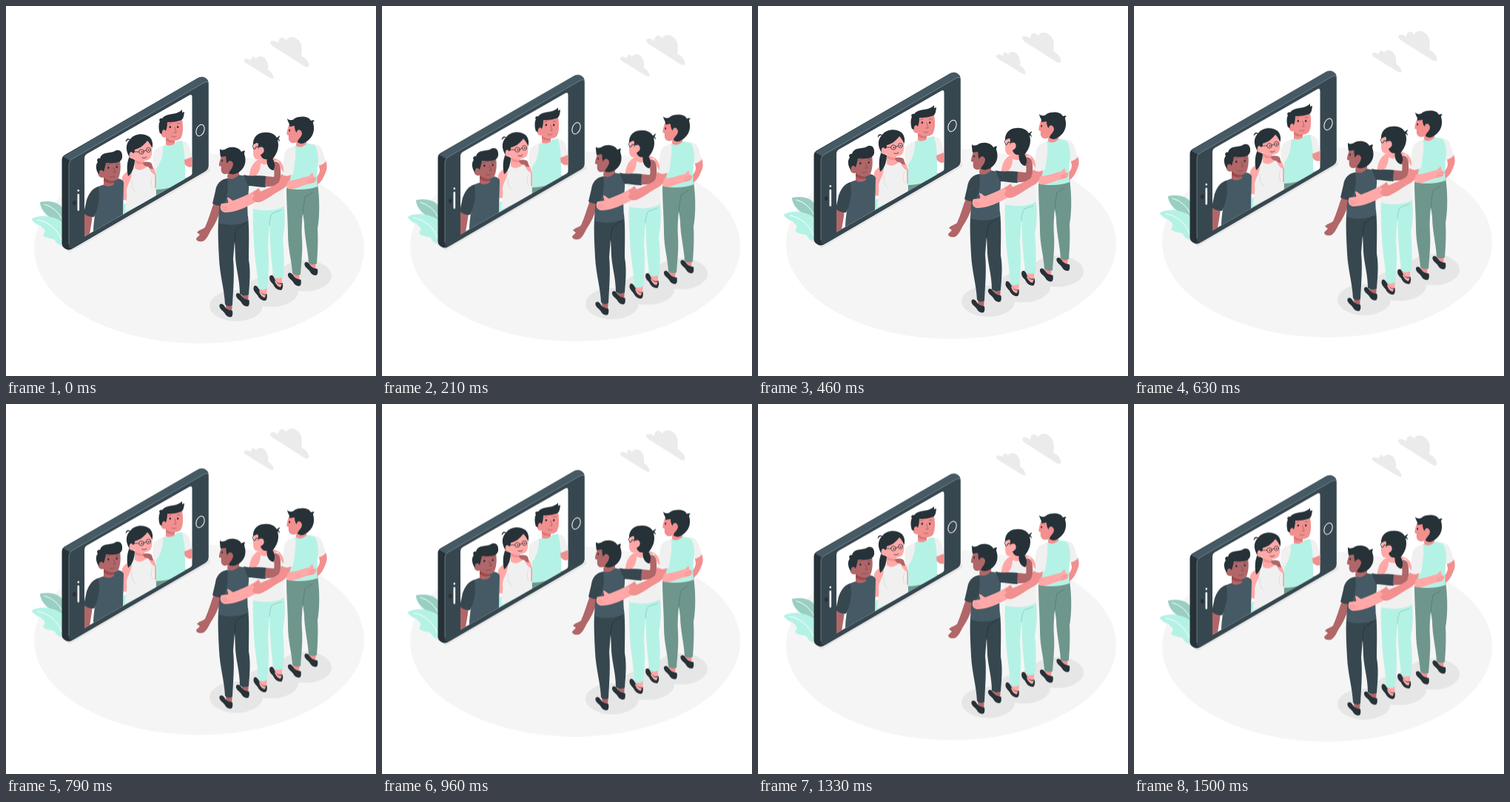
An HTML page for the animation above (1.54 s loop, 500 by 500 pixels).

```html
<!DOCTYPE html>
<html lang="en">
<head>
<meta charset="utf-8">
<title>Group selfie</title>
<style>
html, body { margin: 0; width: 100%; height: 100%; overflow: hidden; background: #fff; }
svg { display: block; width: 100vw; height: 100vh; }
#scene { animation: float 1540ms linear -40ms infinite; }
@keyframes float {
  0%, 100% { transform: translateY(.5px); }
  50% { transform: translateY(-9.5px); }
}
.ink { fill: #263238; }
.navy { fill: #37474f; }
.slate { fill: #455a64; }
.brown { fill: #b16668; }
.umber { fill: #9a4a4d; }
.pink { fill: #ffa8a7; }
.rose { fill: #f28f8f; }
.mint { fill: #b5f2e6; }
.sage { fill: #6f968c; }
.white { fill: #f0f0f0; }
.cloud { fill: #ebebeb; }
.shade { fill: #e6e6e6; }
.line { fill: none; stroke-linecap: round; stroke-linejoin: round; }
.fold { stroke: #263238; stroke-width: .6; opacity: .6; }
</style>
</head>
<body>
<svg viewBox="0 0 500 500">
<defs>
  <clipPath id="screen"><path d="M106 206Q106 202 109 200L247 121Q251.500 118.500 251.500 123V226Q251.500 228 249 229.500L106 311.500Z"/></clipPath>
  <path id="shoe" d="M0 3C2 .5 5 1.500 7 5C9 9 14 10 17.500 11C18 14 18 17 16.500 19C13 20.500 9 18 7 14C4 10 -1 8 0 3Z"/>
</defs>
<g id="scene">
  <ellipse cx="261" cy="327.500" rx="223" ry="128.500" fill="#f5f5f5"/>

  <g class="cloud">
    <path d="M357.500 51C355.500 47 361 44.500 368 50C368 42 375 40 379 47C380 40.500 390 40 396 47C401 53 400 60 399 67.500C405 70 410 76 409.500 81C408 84 403 82 401 80L360 54Z"/>
    <path d="M322 75C321 71 326 70 331 73.500C331 67 336 67 338 72C339 67 346 67 350.500 71C354 76 355 81 354 86.500C358 88 362 94 361.500 97.500C360 99 356 97 354 95.500L324 77Z"/>
  </g>

  <!-- plant -->
  <path fill="#99cfc2" d="M78 293V275C72 266 62 262 46 265C46 271 50 278 56 283C62 288 70 291 78 293Z"/>
  <path class="mint" d="M78 293C70 287 60 284 50 284C44 284 38 285 34.500 288.500C38 293 42 296 47.500 297C46 299 52 300 52 303C54 306 49 308 51 311C55 314 62 314 66 316C67 320 72 324 78 325Z"/>
  <path class="line" stroke="#fff" d="M52 268Q68 272 77 290M43 289C57 291 70 302 75 316"/>

  <!-- phone -->
  <path class="shade" d="M71 322L86 333L276 223V218L90 322Z"/>
  <path class="ink" d="M75.500 208Q75.500 203.500 79 201.500L259 97.500Q264 94.500 269 97Q273.500 99.500 273.500 104V216Q273.500 221 269 223.500L92 326.500Q86 331 81 328.500Q75.500 326 75.500 321Z"/>
  <path class="slate" d="M77 203.500L259 97.500Q264 94.500 269 97Q273 99 273.500 103L88 210Z"/>
  <path class="navy" d="M85 214Q85 209.500 89 207L266 104.500Q273.500 100.500 273.500 106V216Q273.500 221 269 223.500L92 326.500Q85 330 85 324Z"/>
  <path class="line" stroke="#91a1a9" stroke-width=".6" d="M85 322V214Q85 209.500 89 207L266 104.500Q271 101.500 273 103"/>
  <path fill="#fff" d="M106 206Q106 202 109 200L247 121Q251.500 118.500 251.500 123V226Q251.500 228 249 229.500L106 311.500Z"/>
  <ellipse class="line" cx="262.500" cy="168" rx="5.200" ry="8" transform="rotate(22 262.500 168)" stroke="#fff"/>
  <path class="line" stroke="#fff" stroke-width="2.600" d="M97.800 255V275.500M97.800 249.200v.2"/>
  <ellipse class="ink" cx="92.300" cy="266" rx="2.300" ry="3"/>

  <g clip-path="url(#screen)">
    <!-- tall friend -->
    <path class="sage" d="M202 240L243 232V250L200 262Z"/>
    <path class="white" d="M200 196C206 190 214 188 220 187L232 183C239 181 244 183 247 188L252 205L241 209L238 200L206 215L202 225C198 218 197 204 200 196Z"/>
    <path class="mint" d="M212 189L219 187Q226 189 231 183L238 182C241 194 242 205 242 215V235C230 244 216 248 203 248V220C208 214 213 202 212 189Z"/>
    <path class="rose" d="M241 208L251 204L253 217C248 219 243 217 241.500 213Z"/>
    <path class="rose" d="M216 174L228 180V186Q223 190 216 187.500Z"/>
    <path class="umber" opacity=".35" d="M216 178Q222 183 228 182V184Q220 186 216 181Z"/>
    <path class="rose" d="M214 155L237 150C240 160 240 172 236 179C230 184 221 182 217 177C212 180 208 174 210 169C211 167 213 167 214 168Z"/>
    <path class="ink" d="M208 172C206 167 206 159 208 156C206 154 208 151 211 152C216 145 226 147 232 144C235 143 237 141 238 140C238 142 238 143 238 144L241 143C240 150 240 154 234 155C228 157 222 157 218 157C218 162 217 166 216 169C213 165 210 169 211 173Z"/>
    <path class="ink" d="M220.500 163.500a1.300 1.600 0 1 0 2.600 0a1.300 1.600 0 1 0-2.600 0M231 163.500a1.200 1.500 0 1 0 2.400 0a1.200 1.500 0 1 0-2.400 0"/>
    <path class="line fold" d="M219 160q2-2 4-1.500M231 159q2-1.500 4 0M228 164L230 171H227M224 176q4 2 6 0"/>

    <!-- friend with glasses -->
    <path class="mint" d="M159 268L203 242V260L156 288Z"/>
    <path class="pink" d="M157 231C161 223 170 220 177 218L190 214C197 214 201 219 203 228V246L197 246L164 263L158 262C156 252 156 241 157 231Z"/>
    <path class="white" d="M170 221L174 219Q180 225 189 218L193 217C194 222 197 226 201 228V245C204 253 202 257 201 260L161 278C162 266 164 258 163 251C163 240 171 236 170 221Z"/>
    <path class="line" stroke="#d5d5d5" stroke-width=".7" d="M170 236Q169 247 176 252M198 230Q194 238 198 245"/>
    <path class="ink" d="M167 203C163 211 163 222 165 230C170 227 174 217 174 208Z"/>
    <path class="pink" d="M174 201L187 208V217Q181 223 174 219Z"/>
    <path class="rose" d="M174 208Q181 212 187 211V213Q178 216 174 210Z"/>
    <path class="pink" d="M174 184L193 179C198 187 199 200 195 206C189 211 180 210 175 205C169 209 165 204 166 200C167 196 171 195 173 197Z"/>
    <path class="ink" d="M167 204C162 197 161 187 167 181C165 180 163 182 162 184C161 180 165 178 168 180C173 172 187 171 194 177C198 181 199 187 197.500 192C196 188 194 185 191 182C185 190 179 193 174 194C174 197 173 199 172 199C168 195 166 199 167 204Z"/>
    <g class="line" stroke="#263238" stroke-width=".8">
      <ellipse cx="183" cy="197" rx="3.300" ry="3.200"/><ellipse cx="192.500" cy="194.500" rx="2.900" ry="3.200"/>
      <path d="M173 197L179.500 197M186.500 196L189.500 195M184 205q4 1.500 6-1"/>
      <path d="M183.500 197v.3M192.500 194.500v.3" stroke-width="1.700"/>
    </g>
    <path class="brown" d="M185 212C188 210 194 210 197 213L199 220C196 221 193 219 192 217C189 217 185 215 185 212Z"/>

    <!-- friend in the dark shirt -->
    <path class="brown" d="M106 280L117 282C116 292 114 302 112 314H104Z"/>
    <path class="slate" d="M119 248C123 244 129 242 134 241L146 234C152 232 157 234 159 238L158 282L118 306C118 294 120 284 121 276C117 264 116 255 119 248Z"/>
    <path class="navy" d="M125 244C117 246 112 253 109 262L105 280C109 284 114 285 119 285C124 274 126 264 126 256Z"/>
    <path class="brown" d="M132 228L146 236V241Q139 246 132 242Z"/>
    <path class="umber" d="M132 232Q139 237 146 236V239Q137 241 132 236Z"/>
    <path class="brown" d="M130 210L153 205C156 214 155 228 151 234C146 238 138 237 133 231C128 234 123 229 125 224C126 221 129 221 130 223Z"/>
    <path class="ink" d="M125 227C121 221 121 214 124 211C122 208 124 205 127 206C130 196 140 200 147 196C152 193 157 196 157 202C158 208 153 212 147 212C142 213 138 212 135 212C134 217 133 221 132 224C128 220 125 223 126 227Z"/>
    <path class="ink" d="M137 218.500a1.300 1.600 0 1 0 2.600 0a1.300 1.600 0 1 0-2.600 0M148.500 217.500a1.200 1.500 0 1 0 2.400 0a1.200 1.500 0 1 0-2.400 0"/>
    <path class="line fold" d="M136 215q2-2 4-1.500M148 214q2-1 4 0M145 219L148 225H145M141 231q4 1 6-1"/>
  </g>

  <g class="shade">
    <ellipse cx="311" cy="405" rx="36" ry="21"/>
    <ellipse cx="359" cy="385.500" rx="36" ry="21"/>
    <ellipse cx="404.500" cy="364.500" rx="35.500" ry="21"/>
  </g>

  <!-- tall friend, from behind -->
  <path class="rose" d="M387 355H397L396 370L388 366ZM409 342H419L418 356L410 352Z"/>
  <path class="sage" d="M379 246L421 240C424 260 424 285 421 301C422 318 421 335 420 348Q414 351 409 347C408 330 403 310 403 293L401 279C400 291 399 303 400 315C401 332 399 349 398 363Q391 365 387 361C386 343 381 329 381 308C381 290 379 268 379 246Z"/>
  <path class="line" stroke="#567b72" stroke-width=".8" d="M401 282Q402 268 404 258L414 252"/>
  <use href="#shoe" class="ink" x="381" y="359"/>
  <use href="#shoe" class="ink" x="403.500" y="344.500"/>
  <path class="rose" d="M422 212L432 209C434 215 434 218 433 222C430 230 427 238 420 242L419 232C423 228 424 224 424 221Z"/>
  <path class="white" d="M414 187C422 186 426 191 428 197L432 210C429 214 424 216 419 216Z"/>
  <path class="mint" d="M388 190L403 185L415 187C421 190 422 200 422 210C420 222 420 236 421 244C409 249 390 249 379 246C378 235 382 210 388 190Z"/>
  <path class="white" d="M391 190C382 190 377 195 376 202L372 229C377 232 384 231 388 227C390 215 392 201 391 190Z"/>
  <path class="rose" d="M393 169H406V186Q399 193 392 189Z"/>
  <path class="rose" d="M383 159C381 164 379 171 379.500 174L382 175C381 181 383 186 390 185L399 182L404 160L390 156Z"/>
  <path class="ink" d="M383 163C384 159 381 158 380 152C383 155 387 155 390 152C398 148 409 149 412 155C414 154 416 154 417 155C415 156 415 157 415 158C418 168 415 178 405 184C401 187 396 186 394 184C394 180 400 177 400 172C399 166 393 166 393 171C391 170 390 166 390 162Z"/>
  <path class="ink" d="M382 167.500l2-1v3l-1.500 0Z"/>

  <!-- friend with glasses, from behind -->
  <path class="pink" d="M341 375H353L352 393L342 388ZM360 362H373L373 379L362 375Z"/>
  <path class="mint" d="M334 271L375 265C378 283 377 298 374 315C376 331 376 348 375 366Q367 370 361 366C360 350 357 333 357 316L356 292L354 325C356 344 355 362 353 381Q347 386 341 381C340 359 336 343 335 321C334 303 333 287 334 271Z"/>
  <path class="line" stroke="#83c9ba" stroke-width=".8" d="M356 296Q356 286 360 280L372 276"/>
  <g class="ink">
    <path d="M335 379C337 376 340 379 342 383C344 388 349 391 352.500 389C353 393 353 396 351 398C346 399 342 395 340 391C337 387 333 384 335 379ZM356.500 365C359 362 362 365 363 369C365 374 370 376 373.500 374C375 378 374 382 372 384C367 384 363 381 361 376C358 373 355 370 356.500 365Z"/>
  </g>
  <path class="pink" d="M343 385q5 7 8 5l-1 4q-5 0-8-8ZM364 371q5 7 9 4l-2 5q-5-1-8-8Z"/>
  <path class="pink" d="M340 208L357 203L368 208C374 211 376 219 375 228L371 243L330 243C327 230 329 215 340 208Z"/>
  <path class="white" d="M344 213L348 211Q356 219 364 209L368 209C369 216 372 222 376 225C376 240 374 255 376 270C364 278 346 277 334 274C336 260 330 245 332 234C339 230 344 223 344 213Z"/>
  <path class="pink" d="M346 199L360 200L359 211Q350 217 344 212Z"/>
  <path class="pink" d="M337 184C334 190 333 198 335 204C337 209 344 208 350 204L354 183Z"/>
  <path class="line" stroke="#263238" stroke-width=".9" d="M334.500 186Q332 190 335 193.500Q338 193 338 190L345 190.500"/>
  <path class="ink" d="M334 188C333 178 340 171 349 171C357 170 363 173 366 178C367 177 369 176 370 175C370 177 369 178 368 179C370 180 370 182 369 184C369 181 368 181 367 181C370 191 366 200 360 207C364 212 364 218 361 222C355 221 352 213 353 207C349 208 345 205 344 201C349 199 350 194 347 191C343 188 341 191 341 194C340 191 342 187 340 185C337 185 335 187 334 188Z"/>

  <!-- friend in the dark shirt, from behind -->
  <path class="brown" d="M296 399H306L305 414L298 411ZM318 385H328L327 401L319 397Z"/>
  <path class="navy" d="M287 289L327 284C329 302 328 326 328 343C331 359 329 376 328 390Q321 393 316 389C316 371 311 356 310 340L309 317L307 342C309 362 307 383 306 404Q301 408 296 403C295 382 289 364 288 342C287 324 286 306 287 289Z"/>
  <path class="line" stroke="#263238" stroke-width=".8" d="M309 320Q309 308 312 301L324 293"/>
  <use href="#shoe" class="ink" x="288.500" y="401"/>
  <use href="#shoe" class="ink" x="311" y="386.500"/>
  <path class="brown" d="M281 266L292 268C289 280 284 293 277 303C274 308 271 316 266 318C262 319 257 318 257 314L262 309L258 306C261 302 266 302 269 299C274 288 277 276 281 266Z"/>
  <path class="slate" d="M297 234L313 228L325 230C330 238 328 252 326 266L327 290C316 297 299 297 287 293C288 271 289 248 297 234Z"/>
  <path class="navy" d="M299 233C290 234 284 241 283 250L279 267C284 270 290 271 294 269C299 259 301 246 299 233Z"/>
  <path class="navy" d="M321 228C331 231 341 228 352 230L351 245C342 245 334 243 327 243Z"/>
  <path class="brown" d="M301 213H315V228Q306 237 299 232Z"/>
  <path class="brown" d="M292 200C290 206 287.500 213 288 216L291 217C290 223 291 228 298 227L309 223L312 202Z"/>
  <path class="ink" d="M290 204C289 199 289 196 289 193C292 196 296 194 299 192C307 189 316 192 318 197C320 196 322 195 323 196C322 198 322 199 322 200C326 211 322 220 314 225C309 228 304 228 301 226C303 221 307 219 307 213C305 207 300 209 299 213C297 210 298 205 297 203Z"/>
  <path class="ink" d="M291 208.500l2-1v3l-1.500 0Z"/>

  <!-- linked arms -->
  <path class="brown" d="M351 230L362 231C364 224 360 217 362 211C367 208 371 214 371 222C371 231 372 239 368 242C362 244 356 244 350 244Z"/>
  <path class="ink" d="M353 205C351 213 355 221 361 222C364 218 364 212 360 206Z"/>
  <path class="pink" d="M337 249C325 256 315 260 307 263C304 262 301 258 299 259C299 262 301 264 300 266L291 267C288 272 290 279 297 279C312 279 328 270 341 263Z"/>
  <path class="rose" d="M372 227Q379 232 385 228C384 239 378 246 369 250C360 255 352 262 343 265C338 266 334 264 333 260L340 256L333 253L343 251C353 247 365 242 369 238Z"/>
  <path class="rose" d="M333 253L341 246L344 250L340 255Q344 258 339 261L333 260L336 256Z"/>
  <path class="pink" d="M381 236C391 236 402 231 409 230L414 225C416 228 414 230 419 232C421 238 414 240 407 241C397 243 389 250 379 246Z"/>
  <path class="line" stroke="#e47c80" stroke-width=".6" d="M410 235l8-2M409 238l8-1M292 272l6 0M293 275l6 0"/>
</g>
</svg>
</body>
</html>
```
